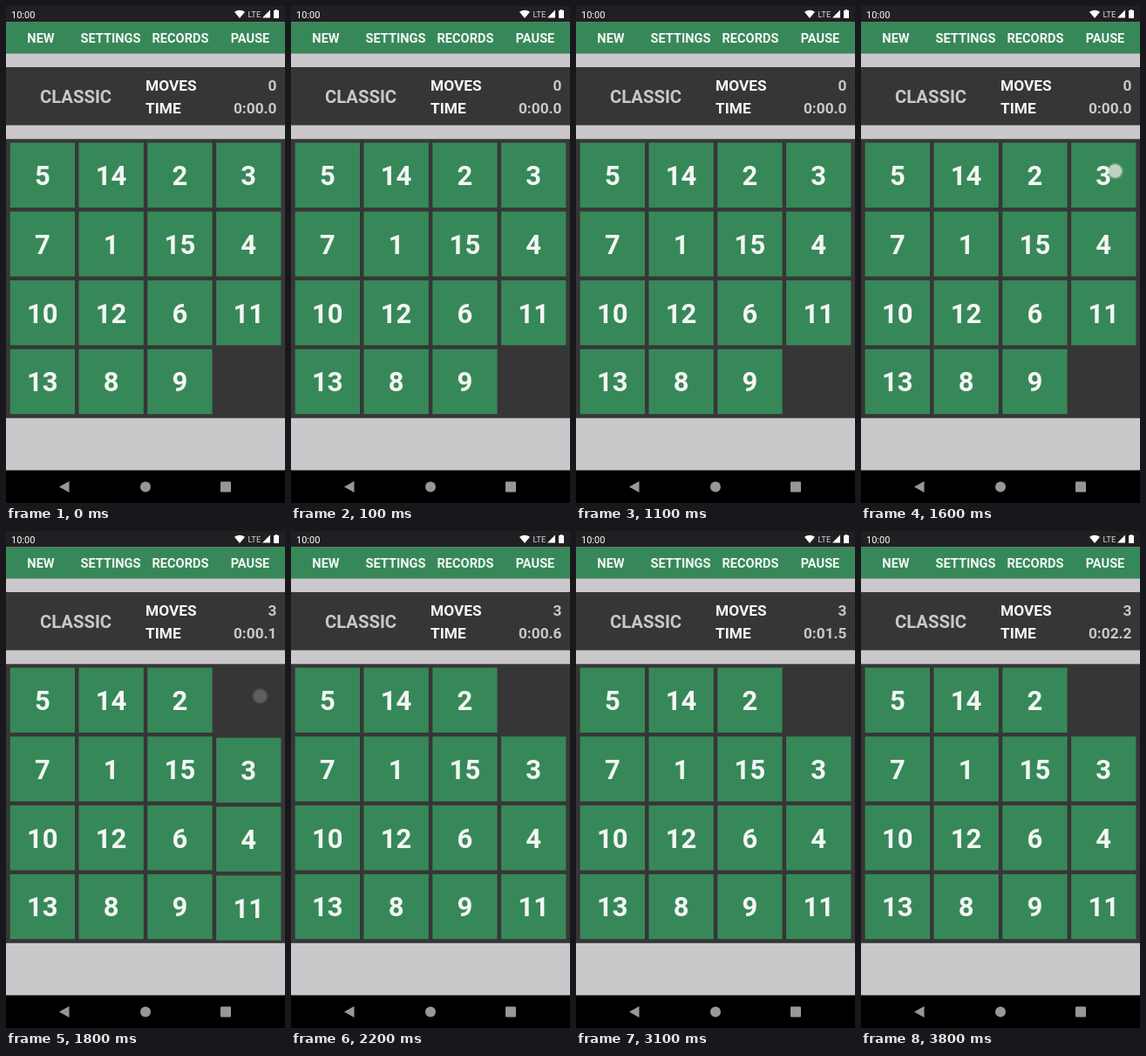
An HTML page that plays this animation: 320 px wide and 569 px high, repeating every 3.9 s.

```html
<!DOCTYPE html>
<html lang="en">
<head>
<meta charset="utf-8">
<title>Fifteen puzzle</title>
<style>
  html, body { margin: 0; height: 100%; overflow: hidden; background: #000; }
  svg { display: block; width: 100%; height: 100%; font-family: Roboto, sans-serif; }
  .bold { font-weight: 700; fill: #f4f6f4; }
  .mid { text-anchor: middle; }
  .end { text-anchor: end; }
  .dim { fill: #c8c8c8; }
</style>
</head>
<body>
<svg viewBox="0 0 320 569">
  <rect width="320" height="569" fill="#cbc8cb"/>
  <rect width="320" height="18.5" fill="#211f22"/>
  <rect y="18.5" width="320" height="36" fill="#378859"/>
  <rect y="70" width="320" height="66.5" fill="#363636"/>
  <rect y="152.3" width="320" height="319.5" fill="#363636"/>
  <rect y="531.5" width="320" height="37.5"/>

  <g fill="#fff">
    <text x="6" y="13.5" font-size="11">10:00</text>
    <path d="M262 6.8Q268 2.6 274 6.8L268 14Z"/>
    <text x="277.5" y="13" font-size="9.5" fill="#d8d8d8">LTE</text>
    <path d="M294 13.5H303V4.5Z"/>
    <path d="M307 5H308.8V4H311.2V5H313V14H307Z"/>
  </g>

  <g class="bold mid" font-size="14.6">
    <text x="40" y="42">NEW</text>
    <text x="120" y="42">SETTINGS</text>
    <text x="200" y="42">RECORDS</text>
    <text x="280" y="42">PAUSE</text>
  </g>
  <g class="bold" font-size="17.3">
    <text class="mid dim" x="80" y="111" font-size="20.3">CLASSIC</text>
    <text x="160" y="96.5">MOVES</text>
    <text x="160" y="123">TIME</text>
    <text class="end dim" id="moves" x="310.5" y="96.5"></text>
    <text class="end dim" id="time" x="310.5" y="123"></text>
  </g>

  <g id="board" class="bold mid" font-size="31"></g>

  <g id="touch">
    <circle cx="291.5" cy="189" r="9" fill="#d5ddd5" opacity=".45"/>
    <circle cx="291.5" cy="189" r="7.3" fill="#d5ddd5" opacity=".75"/>
  </g>

  <g fill="#979797">
    <path d="M61 550.5L72.5 544V557Z"/>
    <circle cx="160" cy="550.5" r="6"/>
    <rect x="246" y="544.5" width="12" height="12" rx="1"/>
  </g>
</svg>
<script>
  const LOOP = 3900, STEP = 100, PITCH = 78.8;
  const MOVE_START = 1604, MOVE_LENGTH = 240, OVERSHOOT = 0.9;
  const TOUCH_START = 1590, TOUCH_RELEASE = 1700, TOUCH_FADE = 140;
  const numbers = [5, 14, 2, 3, 7, 1, 15, 4, 10, 12, 6, 11, 13, 8, 9];
  const byId = id => document.getElementById(id);
  const clamp = v => Math.min(1, Math.max(0, v));

  byId('board').innerHTML = numbers.map((n, i) => {
    const x = 4.7 + i % 4 * PITCH, y = 156.5 + Math.floor(i / 4) * PITCH;
    return `<g transform="translate(${x} ${y})"><g class="${i % 4 === 3 ? 'sliding' : ''}">
      <rect width="74.3" height="74.3" fill="#378859"/>
      <text x="37.1" y="48.5">${n}</text></g></g>`;
  }).join('');
  const sliding = document.querySelectorAll('.sliding');

  function easeOutBack(u) {
    const v = u - 1;
    return 1 + (OVERSHOOT + 1) * v ** 3 + OVERSHOOT * v ** 2;
  }

  function draw(t) {
    const shift = PITCH * easeOutBack(clamp((t - MOVE_START) / MOVE_LENGTH));
    sliding.forEach(tile => tile.setAttribute('transform', `translate(0 ${shift})`));

    // The recorded clock runs slightly fast.
    const tenths = Math.floor(Math.max(0, t - MOVE_START) * 1.01 / 100);
    byId('moves').textContent = t > MOVE_START ? 3 : 0;
    byId('time').textContent = `0:0${Math.floor(tenths / 10)}.${tenths % 10}`;

    const fade = 1 - clamp((t - TOUCH_RELEASE) / TOUCH_FADE);
    byId('touch').setAttribute('opacity', t < TOUCH_START ? 0 : fade);
  }

  const start = performance.now();
  function tick() {
    const t = (performance.now() - start) % LOOP;
    draw(Math.floor(t / STEP) * STEP);
    requestAnimationFrame(tick);
  }
  tick();
</script>
</body>
</html>
```
